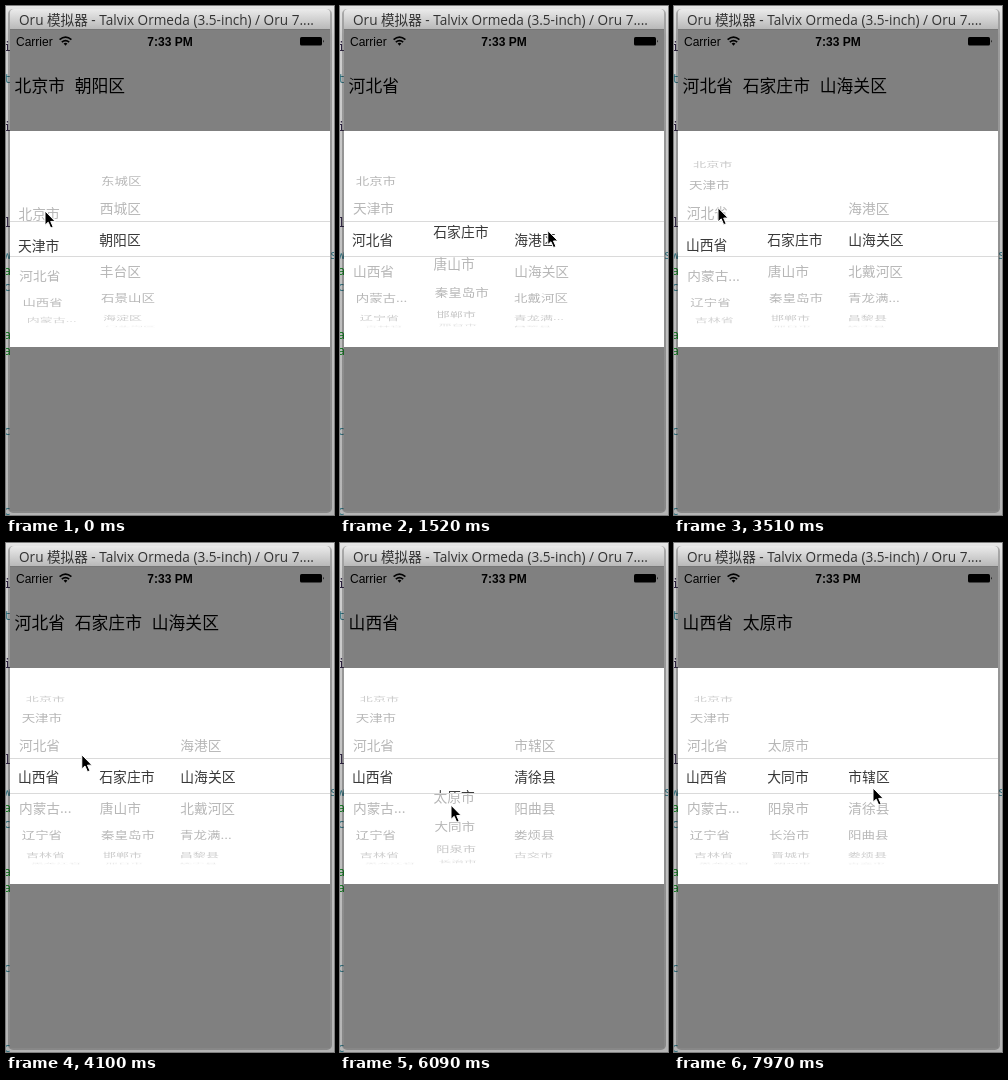
Animation of 328x509 px, one loop 8000 ms. Source, as an HTML page:

```html
<!DOCTYPE html>
<html lang="zh-CN">
<head>
<meta charset="utf-8">
<title>Region picker</title>
<style>
  html, body { margin: 0; width: 100%; height: 100%; overflow: hidden; background: #b4b4b4; }
  svg { display: block; width: 100%; height: 100%; }
  .cjk { font-family: "Noto Sans CJK SC", "Noto Sans CJK", sans-serif; font-weight: 300; }
  .title { font: 13.6px "Open Sans", "Noto Sans CJK SC", "Noto Sans CJK", sans-serif; fill: #333; }
  .status { font: 12px "Liberation Sans", sans-serif; }
  .clock { font-weight: bold; text-anchor: middle; }
  .label { font-size: 16.8px; }
  .row { font-size: 13.8px; }
  .code { font: 12px "Noto Sans Mono", monospace; text-anchor: end; }
</style>
</head>
<body>
<svg viewBox="0 0 328 509">
  <defs>
    <linearGradient id="desk" x2="0" y2="1">
      <stop offset="0" stop-color="#e6e6e6"/><stop offset=".06" stop-color="#cecece"/><stop offset="1" stop-color="#b4b4b4"/>
    </linearGradient>
    <linearGradient id="bar" x2="0" y2="1">
      <stop offset="0" stop-color="#ebebeb"/><stop offset="1" stop-color="#b6b6b6"/>
    </linearGradient>
    <clipPath id="inside"><path d="M4 216H324V250H4Z"/></clipPath>
    <clipPath id="outside"><path d="M4 125H324V215H4ZM4 251H324V322H4Z"/></clipPath>
  </defs>

  <rect width="328" height="509" fill="url(#desk)"/>
  <g id="code"></g>
  <rect x="3" y="4" width="322" height="502" rx="4" fill="none" stroke="#000" stroke-opacity=".25" stroke-width="2"/>

  <path d="M4 24V7Q4 3 8 3H320Q324 3 324 7V24Z" fill="url(#bar)"/>
  <path d="M4 23.5H324" stroke="#777"/>
  <text class="title" x="13" y="19">Oru 模拟器 - Talvix Ormeda (3.5-inch) / Oru 7....</text>

  <rect x="4" y="24" width="320" height="481" fill="#808080"/>
  <text class="status" x="10" y="39.5">Carrier</text>
  <text class="status clock" x="164" y="39.5">7:33 PM</text>
  <g fill="none" stroke="#000" stroke-width="1.7">
    <path d="M53.6 33.6Q59.5 28.6 65.4 33.6M55.8 36.1Q59.5 33 63.2 36.1"/>
    <path d="M57.6 37.6Q59.5 36.1 61.4 37.6L59.5 39.8Z" fill="#000" stroke="none"/>
  </g>
  <rect x="294" y="31" width="22" height="8.6" rx="1.6"/>
  <path d="M317 33.8Q318.6 35.3 317 36.8Z"/>
  <g id="label" class="cjk label"></g>

  <rect x="4" y="125" width="320" height="216" fill="#fff"/>
  <path d="M4 215.5H324M4 250.5H324" stroke="#dadada"/>
  <g id="dim" class="cjk row" fill="#b6b6b6" clip-path="url(#outside)"></g>
  <g id="lit" class="cjk row" fill="#383838" clip-path="url(#inside)"></g>

  <path id="cursor" d="M0 0V14.2L3.2 11.2L5.7 17L8.2 16L5.7 10.4H10.2Z" stroke="#fff"/>
</svg>
<script>
const LOOP = 8000, TICK = 117.2, LEAD = 12;
const STEP = 0.37, RADIUS = 87, MIDDLE = 233.5, AXIS = 164, PITCH = 31;
const COLUMN_X = [12, 93.3, 174.3], REACH = 5;
const [PROVINCE, CITY, DISTRICT] = [0, 1, 2];

const words = s => s.split(' ');
const PROVINCES = words('北京市 天津市 河北省 山西省 内蒙古... 辽宁省 吉林省 黑龙江省 上海市');
const BEIJING = words('东城区 西城区 朝阳区 丰台区 石景山区 海淀区 门头沟区');
const HEBEI = words('石家庄市 唐山市 秦皇岛市 邯郸市 邢台市 保定市 张家口市');
const SHANXI = words('太原市 大同市 阳泉市 长治市 晋城市 朔州市 晋中市');
const COAST = words('海港区 山海关区 北戴河区 青龙满... 昌黎县 抚宁县 卢龙县');
const TAIYUAN = words('市辖区 清徐县 阳曲县 娄烦县 古交市');

// What each selection shows, from the given tick on
const SCENES = [
  { from: 0, label: '北京市 朝阳区', cities: BEIJING, districts: [] },
  { from: 11, label: '河北省', cities: HEBEI, districts: COAST },
  { from: 25, label: '河北省 石家庄市 山海关区', cities: HEBEI, districts: COAST },
  { from: 37, label: '山西省', cities: SHANXI, districts: TAIYUAN },
  { from: 59, label: '山西省 太原市', cities: SHANXI, districts: TAIYUAN }
];

// Moves: each returns a step that applies its eased share f to the state
const step = (from, to, apply) => ({ from, to, apply });
const glide = (from, to, x, y) => step(from, to, (s, f) => {
  s.x += (x - s.x) * f;
  s.y += (y - s.y) * f;
});
const drag = (col, from, to, rows) => step(from, to, (s, f) => {
  s.wheels[col] += rows * f;
  s.y -= rows * PITCH * f;
});
const settle = (col, from, row, ticks = 3) => step(from, from + ticks, (s, f) => {
  s.wheels[col] += (row - s.wheels[col]) * f;
});

const SCRIPT = [
  drag(PROVINCE, 0, 6, 1.04), settle(PROVINCE, 7, 2),
  glide(8, 11, 262, 205), settle(CITY, 11, 0), glide(11, 14, 201, 227),
  drag(DISTRICT, 15, 20, 1.48), settle(DISTRICT, 21, 1),
  glide(22, 28, 44, 227),
  drag(PROVINCE, 28, 31, .92), settle(PROVINCE, 33, 3),
  glide(34, 40, 148, 242), glide(40, 41, 111, 242),
  drag(CITY, 47, 52, -.65), settle(CITY, 56, 0),
  glide(57, 60, 134, 274), settle(DISTRICT, 60, 0), glide(60, 63, 114, 220),
  drag(CITY, 63, 65, .94), settle(CITY, 66, 1, 1),
  glide(66, 68, 199, 245)
];

const easeOut = t => t * (2 - t);

function stateAt(tick) {
  const state = { wheels: [.8, 2, 0], x: 39, y: 205 };
  for (const { from, to, apply } of SCRIPT)
    if (tick > from) apply(state, easeOut(Math.min(1, (tick - from) / (to - from))));
  return state;
}

const $ = id => document.getElementById(id);
function addText(parent, attrs, content = '') {
  const el = document.createElementNS('http://www.w3.org/2000/svg', 'text');
  for (const name in attrs) el.setAttribute(name, attrs[name]);
  el.textContent = content;
  return parent.appendChild(el);
}

// Slivers of the editor behind the window, one character per line
const INKS = { a: '#0d7a1c', i: '#2a1f3c', l: '#2a1f3c' };
function addEdge(x, lines) {
  [...lines].forEach((ch, i) => {
    if (ch !== ' ') addText($('code'), { class: 'code', x, y: 45 + 16 * i, fill: INKS[ch] || '#2f6f7c' }, ch);
  });
}
addEdge(5, 'i t  i     l wac  aa    c    c');
addEdge(331, 's'.padStart(14));

const slots = COLUMN_X.map(() => Array.from({ length: 2 * REACH + 1 }, () =>
  [$('dim'), $('lit')].map(layer => addText(layer, { y: 5.1 }))));

function drawWheel(col, items, pos) {
  const base = Math.round(pos) - REACH;
  slots[col].forEach((pair, i) => {
    const angle = (base + i - pos) * STEP, turn = Math.cos(angle);
    const name = Math.abs(angle) < 1.52 && items[base + i] || '';
    const depth = 1 - .093 * (1 - turn);
    const x = AXIS + (COLUMN_X[col] - AXIS) * depth, y = MIDDLE + RADIUS * Math.sin(angle);
    for (const el of pair) {
      el.textContent = name;
      el.setAttribute('transform', `translate(${x} ${y}) scale(${depth} ${Math.max(turn, .01)})`);
      el.setAttribute('opacity', Math.min(1, .25 + Math.max(turn, 0)));
    }
  });
}

function drawLabel(label) {
  $('label').replaceChildren();
  let x = 8.6;
  for (const part of words(label)) {
    addText($('label'), { x, y: 86.3 }, part);
    x += part.length * 16.8 + 9.8;
  }
}

function draw(tick) {
  const { wheels, x, y } = stateAt(tick);
  const scene = SCENES.filter(s => s.from <= tick).pop();
  [PROVINCES, scene.cities, scene.districts].forEach((items, col) => drawWheel(col, items, wheels[col]));
  drawLabel(scene.label);
  $('cursor').setAttribute('transform', `translate(${x} ${y})`);
}

const start = performance.now();
let shown = -1;
function frame() {
  const tick = Math.floor(((performance.now() - start) % LOOP + LEAD) / TICK);
  if (tick !== shown) draw(shown = tick);
  requestAnimationFrame(frame);
}
frame();
</script>
</body>
</html>
```
